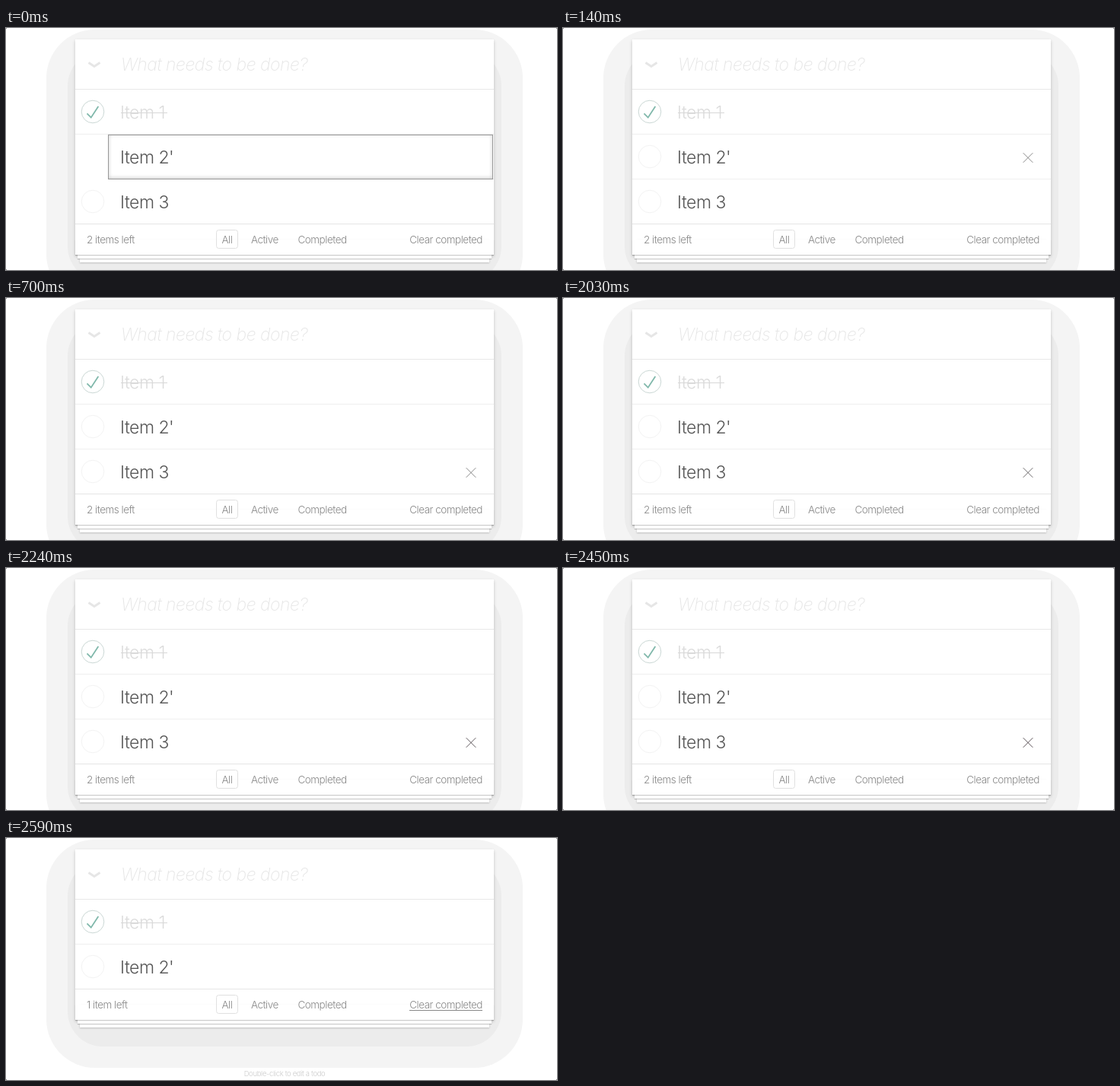
Animation, 724 px wide and 318 px high, one loop 3360 ms. Source, as an HTML page with a canvas:

```html
<!DOCTYPE html>
<html lang="en">
<head>
<meta charset="utf-8">
<title>Todo list</title>
<style>
  html, body { margin: 0; width: 100%; height: 100%; overflow: hidden; background: #fff; }
  canvas { display: block; width: 724px; height: 318px; }
</style>
</head>
<body>
<canvas id="stage" width="724" height="318"></canvas>
<script>
const ctx = document.getElementById('stage').getContext('2d');
const LOOP = 3360;
const EDIT_END = 140, HOVER_LAST = 700, REMOVED = 2590;
const LEFT = 91, RIGHT = 641, TOP = 15, ROW = 59, FIRST_ROW = 80;
const FAMILY = 'Inter, "Liberation Sans", sans-serif';

function rect(x, y, w, h, color) {
  ctx.fillStyle = color;
  ctx.fillRect(x, y, w, h);
}

function roundRect(x, y, w, h, r) {
  ctx.beginPath();
  ctx.roundRect(x, y, w, h, r);
}

function polyline(points, color, width) {
  ctx.beginPath();
  points.forEach(([x, y]) => ctx.lineTo(x, y));
  ctx.strokeStyle = color;
  ctx.lineWidth = width;
  ctx.stroke();
}

function text(str, x, y, size, color, { spacing = -0.5, style = '300', align = 'left' } = {}) {
  ctx.font = `${style} ${size}px ${FAMILY}`;
  ctx.letterSpacing = spacing + 'px';
  ctx.textAlign = align;
  ctx.fillStyle = color;
  ctx.fillText(str, x, y);
}

// One contour of the wide, soft shadow below the card
function halo(bottom, spread, radius, color) {
  const y = TOP + 25 - spread;
  roundRect(LEFT - spread, y, RIGHT - LEFT + 2 * spread, bottom + 25 + spread - y, radius);
  ctx.fillStyle = color;
  ctx.fill();
}

function sheet(inset, top, bottom, offset, blur, color) {
  ctx.save();
  ctx.shadowColor = 'rgba(0,0,0,.2)';
  ctx.shadowOffsetY = offset;
  ctx.shadowBlur = blur;
  rect(LEFT + inset, top, RIGHT - LEFT - 2 * inset, bottom - top, color);
  ctx.restore();
}

function card(bottom) {
  halo(bottom, 38, 64, '#f4f4f4');
  halo(bottom, 10, 46, '#ececec');
  sheet(0, TOP, bottom, 2, 4, '#fff');
  sheet(6, bottom - 20, bottom + 10, 1, 2, '#fdfdfd');
  sheet(3, bottom - 20, bottom + 5, 1, 1, '#fdfdfd');
  sheet(0, bottom - 20, bottom, 1, 1, '#fff');
}

function header() {
  polyline([[108.5, 45.5], [116, 50.5], [123.5, 45.5]], '#e6e6e6', 3);
  text('What needs to be done?', 151, 56, 23, '#e6e6e6', { style: 'italic 200' });
  rect(LEFT, FIRST_ROW, RIGHT - LEFT, 1, '#e8e8e8');
}

function toggle(y, done) {
  ctx.beginPath();
  ctx.arc(114, y + 30, 14.8, 0, 2 * Math.PI);
  ctx.strokeStyle = done ? '#cbd8d5' : '#f3f3f3';
  ctx.lineWidth = 1;
  ctx.stroke();
  if (!done) return;
  const tick = [[72, 25], [42, 71], [27, 56], [23, 60], [43, 80], [77, 28]];
  ctx.beginPath();
  tick.forEach(([px, py]) => ctx.lineTo(99 + px * 0.3, y + 15 + py * 0.3));
  ctx.fillStyle = '#80b8ab';
  ctx.fill();
}

function item(index, label, done = false) {
  const y = FIRST_ROW + index * ROW;
  toggle(y, done);
  text(label, 150, y + 39, 23, done ? '#dcdcdc' : '#555');
  if (done) rect(151, y + 31, 61, 1, '#d8d8d8');
  rect(LEFT, y + ROW, RIGHT - LEFT, 1, '#efefef');
}

function editor(index, label) {
  const y = FIRST_ROW + index * ROW + 1;
  rect(LEFT, y, RIGHT - LEFT, ROW - 1, '#fff');
  rect(LEFT, y + ROW - 1, 43, 1, '#fff');
  ctx.save();
  ctx.beginPath();
  ctx.rect(134, y - 1, 506, ROW + 1);
  ctx.clip();
  // inner shadow cast by a frame around the field
  ctx.shadowColor = 'rgba(0,0,0,.2)';
  ctx.shadowBlur = 5;
  ctx.shadowOffsetY = -1;
  ctx.beginPath();
  ctx.rect(114, y - 20, 546, ROW + 40);
  ctx.rect(135, y + 1, 504, ROW - 2);
  ctx.fillStyle = '#999';
  ctx.fill('evenodd');
  ctx.restore();
  rect(134, y - 1, 506, 1, '#efefef');
  text(label, 150, y + 38, 23, '#555');
}

function cross(index, color) {
  const x = 611, y = FIRST_ROW + index * ROW + 31.5, r = 6.3;
  polyline([[x - r, y - r], [x + r, y + r]], color, 1);
  polyline([[x + r, y - r], [x - r, y + r]], color, 1);
}

function crossColor(t) {
  if (t < 2030) return '#888';
  if (t < 2100) return '#6c696b';
  if (t < 2240) return '#625c60';
  return t < 2450 ? '#5e575b' : '#595055';
}

function footer(y, count, underline) {
  const base = y + 26, size = 13.5, color = '#888';
  rect(LEFT, y, RIGHT - LEFT, 1, '#e6e6e6');
  text(count, 106, base, size, color);
  roundRect(276.5, y + 8.5, 28, 24, 3);
  ctx.strokeStyle = '#e0e0e0';
  ctx.lineWidth = 1;
  ctx.stroke();
  text('All', 283.5, base, size, color);
  text('Active', 322, base, size, color);
  text('Completed', 383.5, base, size, color);
  text('Clear completed', 626, base, size, color, { align: 'right' });
  if (underline) rect(530, base + 2, 96, 1, '#888');
}

function draw(t) {
  const removed = t >= REMOVED;
  const footerTop = FIRST_ROW + (removed ? 2 : 3) * ROW;
  rect(0, 0, 724, 318, '#fff');
  card(footerTop + 41);
  header();
  item(0, 'Item 1', true);
  item(1, "Item 2'");
  if (!removed) item(2, 'Item 3');
  if (t < EDIT_END) editor(1, "Item 2'");
  else if (!removed) cross(t < HOVER_LAST ? 1 : 2, crossColor(t));
  footer(footerTop, removed ? '1 item left' : '2 items left', removed);
  if (removed) {
    text('Double-click to edit a todo', 366, 313, 9.5, '#ccc', { spacing: -0.35, align: 'center' });
  }
  for (const x of [0, 723]) for (const y of [0, 317]) rect(x, y, 1, 1, '#888');
}

const start = performance.now();
function tick() {
  draw((performance.now() - start) % LOOP);
  requestAnimationFrame(tick);
}
tick();
</script>
</body>
</html>
```
